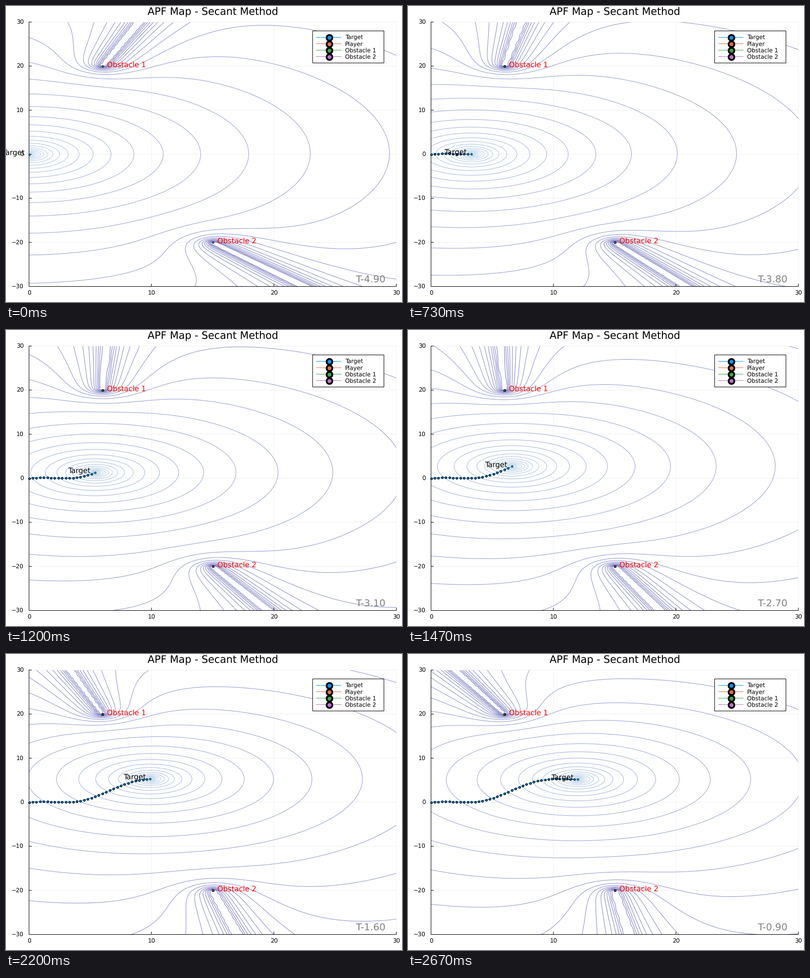
A matplotlib script for the animation above (2.74 s loop, 800x600 px).

```python
import numpy as np
import matplotlib.pyplot as plt
from matplotlib.animation import FuncAnimation
from matplotlib.colors import LinearSegmentedColormap
from matplotlib.patches import Rectangle

W, H, DPI = 800, 600, 100
STEPS, LOOP_MS, TICK_MS = 41, 2740, 20
RATE = 15 / 1000  # steps per millisecond
LEFT, RIGHT, TOP, BOTTOM = 46.5, 788.5, 32.5, 568.5
PT = 72 / DPI  # points per pixel
OBSTACLES = [(6, 20), (15, -20)]
BLUE, ORANGE, GREEN, VIOLET = "#009afa", "#e36f47", "#3ea44e", "#c371d2"
LEVELS, GAIN, CEILING = 30, 5, 1e5

plt.rcParams["font.family"] = "DejaVu Sans"
plt.rcParams["text.hinting"] = "no_hinting"
plt.rcParams["path.snap"] = False

fig = plt.figure(figsize=(W / DPI, H / DPI), dpi=DPI, facecolor="white")
ax = fig.add_axes([0, 0, 1, 1])
ax.set_xlim(0, W)
ax.set_ylim(H, 0)
ax.axis("off")


def px(x):
    return LEFT + np.asarray(x) * (RIGHT - LEFT) / 30


def py(y):
    return (TOP + BOTTOM) / 2 - np.asarray(y) * (BOTTOM - TOP) / 60


def line(xs, ys, color="black", width=1, z=3):
    return ax.plot(xs, ys, color=color, lw=width * PT, zorder=z)[0]


def label(x, y, text, size, color="black", ha="left", z=8):
    return ax.text(x, y, text, fontsize=size * PT, color=color, ha=ha,
                   va="baseline", zorder=z)


def dots(fill, size, edge, z):
    return ax.plot([], [], "o", ms=size * PT, mfc=fill, mec="black",
                   mew=edge * PT, zorder=z)[0]


# Target course: steady in x, a smooth bend in y
knots_x = [0, 0.9, 1.8, 3, 3.9, 4.5, 5.4, 6.6, 8.1, 9.3, 10.8, 12]
knots_y = [0, 0.13, 0.09, 0, 0.2, 0.5, 1.3, 2.7, 4.35, 5.13, 5.3, 5.2]
bend = np.polynomial.Polynomial.fit(knots_x, knots_y, 8)
path_x = 0.3 * np.arange(STEPS)
path_y = bend(path_x)
path_y[0] = 0

# Sampling grid of the potential
nodes = np.linspace(-30, 30, 200)
gx, gy = np.meshgrid(nodes[nodes > -0.5], nodes)


def potential(tx, ty):
    """Log of attraction to the target times a squared-secant repulsion."""
    factor = np.ones_like(gx)
    for ox, oy in OBSTACLES:
        ux, uy = ox - tx, oy - ty
        vx, vy = gx - ox, gy - oy
        r = np.hypot(vx, vy)
        ahead = (vx * ux + vy * uy) / np.hypot(ux, uy)
        factor += 2 * GAIN / np.maximum(r * (r - ahead), 1e-9)
    energy = 0.5 * ((gx - tx) ** 2 + (gy - ty) ** 2) * factor
    return np.log(np.minimum(energy, CEILING))


# Static parts
frame = Rectangle((LEFT, TOP), RIGHT - LEFT, BOTTOM - TOP, fc="none", ec="none")
ax.add_patch(frame)
for v in (0, 10, 20, 30):
    x = px(v)
    line([x, x], [TOP, BOTTOM], "#f1f1f1", z=1)
    line([x, x], [BOTTOM, BOTTOM - 5])
    label(x, 586, str(v), 11.8, ha="center")
for v in range(-30, 31, 10):
    y = py(v)
    line([LEFT, RIGHT], [y, y], "#f1f1f1", z=1)
    line([LEFT, LEFT + 5], [y, y])
    label(36, y + 4.3, str(v).replace("-", "\u2212"), 11.8, ha="right")
line([LEFT, LEFT], [TOP, BOTTOM])
line([LEFT, RIGHT], [BOTTOM, BOTTOM])
label(418, 18.7, "APF Map - Secant Method", 20.7, ha="center")
for i, (ox, oy) in enumerate(OBSTACLES):
    label(px(ox) + 9.5, py(oy) + 2, f"Obstacle {i + 1}", 14.75, "red")

ax.add_patch(Rectangle((619.5, 50.5), 144, 65, fc="white", ec="black",
                       lw=PT, zorder=9))
entries = [("Target", BLUE), ("Player", ORANGE),
           ("Obstacle 1", GREEN), ("Obstacle 2", VIOLET)]
for i, (name, color) in enumerate(entries):
    y = 63.5 + 13 * i
    line([627, 677], [y, y], color, z=10)
    dots(color, 11.5, 3.6, 11).set_data([652.5], [y])
    label(685, y + 4.3, name, 11.8, z=12)

# Moving parts
trail = line([], [], BLUE, z=4)
steps = dots(BLUE, 3.5, 0.8, 5)
marks = [dots(c, 3.6, 1, 5) for c in (GREEN, VIOLET)]
tag = label(0, 0, "Target", 14.75, ha="right")
clock = label(767, 560, "", 19.5, "gray", ha="right")
cmap = LinearSegmentedColormap.from_list("field", [
    (0, "#c3e2f0"), (0.25, "#b3cbe6"), (0.52, "#9aa5d6"),
    (0.75, "#8789cb"), (1, "#7070b8")])
shown = {}


def show_step(k):
    if "field" in shown:
        shown["field"].remove()
    tx, ty = path_x[k], path_y[k]
    z = potential(tx, ty)
    levels = np.linspace(z.min(), z.max(), LEVELS + 2)
    field = ax.contour(px(gx), py(gy), z, levels=levels[1:-1], cmap=cmap,
                       vmin=levels[0], vmax=levels[-1], linewidths=PT,
                       zorder=2)
    field.set_clip_path(frame)
    shown.update(step=k, field=field)

    xs, ys = px(path_x[:k + 1]), py(path_y[:k + 1])
    trail.set_data(xs, ys)
    # older points are painted again on every step, so they look heavier
    repeats = np.arange(k + 1, 0, -1)
    steps.set_data(np.repeat(xs, repeats), np.repeat(ys, repeats))
    for mark, (ox, oy) in zip(marks, OBSTACLES):
        mark.set_data(np.full(k + 1, px(ox)), np.full(k + 1, py(oy)))
    tag.set_position((px(tx) - 9, py(ty) + 2))
    clock.set_text(f"T-{4.9 - 0.1 * k:.2f}")


def draw(i):
    # steps begin on whole hundredths of a second
    k = min(int((i * TICK_MS + 14) * RATE), STEPS - 1)
    if shown.get("step") != k:
        show_step(k)
    return [shown["field"], trail, steps, tag, clock, *marks]


anim = FuncAnimation(fig, draw, frames=LOOP_MS // TICK_MS,
                     init_func=lambda: [], interval=TICK_MS,
                     repeat=True, repeat_delay=0)
plt.show()
```
